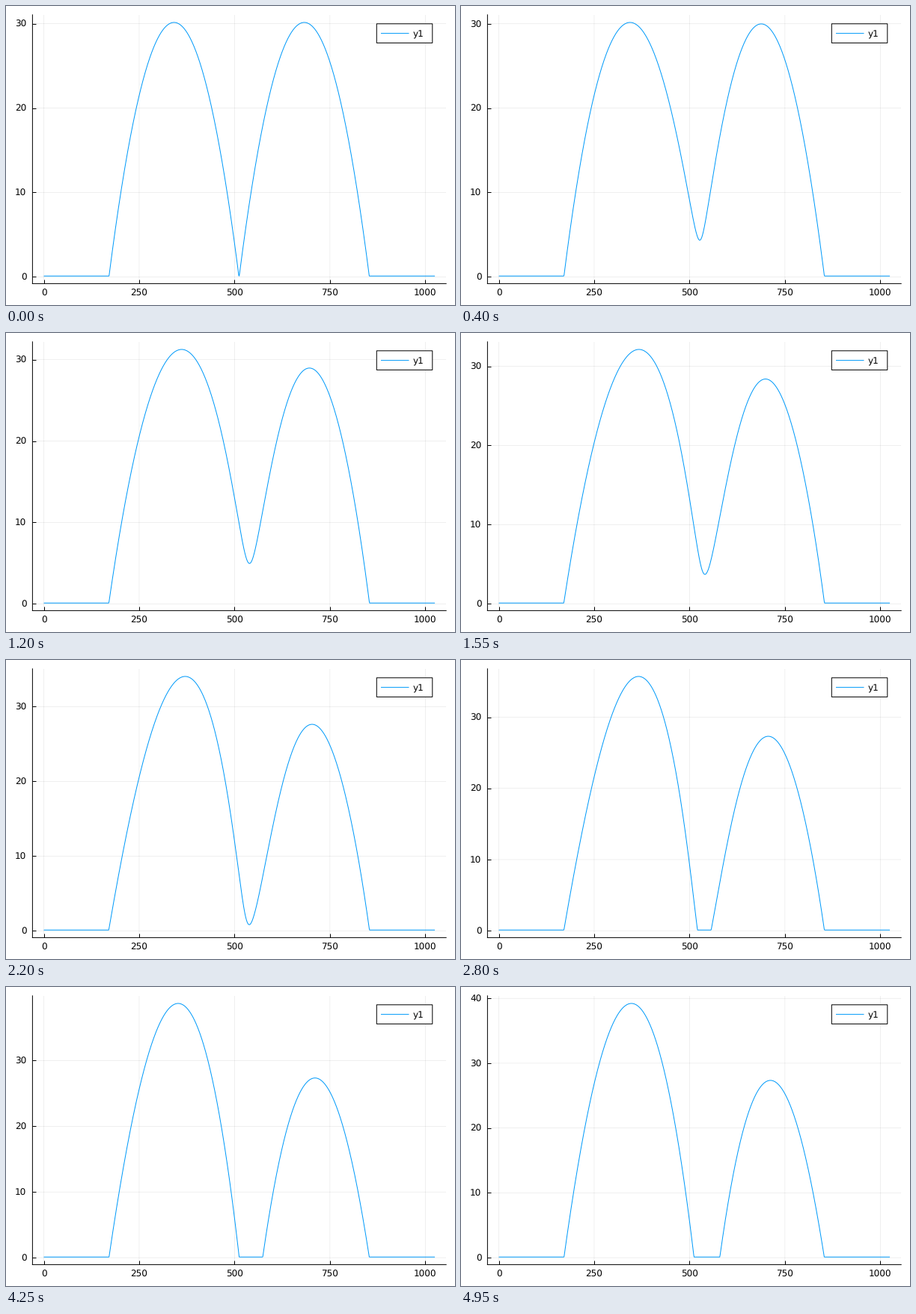
Animation of 600x400 px, one loop 5000 ms. Source, as a matplotlib script:

```python
import numpy as np
import matplotlib.pyplot as plt
from matplotlib.animation import FuncAnimation
from matplotlib.patches import Rectangle

W, H, DPI = 600, 400, 100
FRAMES, STEP = 100, 50
PX = 72 / DPI  # one pixel in points
BLUE = "#009AFA"

plt.rcParams.update({
    "font.family": "DejaVu Sans",
    "font.size": 12 * PX,
    "text.hinting": "none",
    "path.snap": False,
})

N = 1024
x = np.arange(1, N + 1)
OUTER_LEFT, MIDDLE, OUTER_RIGHT = N / 6, N / 2, N * 5 / 6
HEIGHT = 30.15  # both drops at the start
FILM = 0.1


def settle(t, tau, power):
    """Ease from 0 towards 1 around time tau."""
    return 1 - np.exp(-(t / tau) ** power)


def pulse(t, peak, power):
    """Rise from 0 to 1 at time peak, then fade."""
    s = t / peak
    return s**power * np.exp(power * (1 - s))


def cap(start, end, peak, height, bulge):
    """Skewed parabola over start..end; bulge fattens its flanks."""
    p = (peak - start) / (end - start)
    lean = p - 0.5
    skew = 2 * lean / (p * (1 - p) - 2 * lean * lean)
    u = (x - start) / (end - start)
    tilt = 1 + skew * (np.clip(u, 0, 1) - 0.5)
    f = u * (1 - u) * tilt / (p * (1 - p) * (1 + skew * lean))
    return height * f * (1 + bulge * (1 - np.clip(f, 0, 1)))


def profile(t):
    # the bridge grows, then breaks; the drops lend it some height
    bridge = 6.15 * np.cbrt(t) * (1 - settle(t, 3.1, 10))
    loan = 0.05 * bridge
    flow = pulse(t, 1.9, 8)

    # the left drop leans inwards while it fills
    left = cap(OUTER_LEFT, MIDDLE - 0.5 + 24 * pulse(t, 0.9, 1.6),
               N / 3 + 28 * pulse(t, 2.1, 3),
               HEIGHT + 9.35 * settle(t, 2.9, 2.35) - loan,
               0.1 * flow)

    # the right drop drains and its inner edge recedes
    edge = MIDDLE + 27.4 * t**0.56
    inward = np.clip((OUTER_RIGHT - x) / (OUTER_RIGHT - edge), 0, 1)
    right = cap(edge, OUTER_RIGHT,
                N * 2 / 3 + 32 * settle(t, 2, 1),
                HEIGHT - 2.8 * settle(t, 1.56, 2.2) - loan,
                -0.2 * flow * inward)

    joined = (left + right) / 2 + np.hypot((left - right) / 2, bridge)
    return np.maximum(joined, FILM)


fig = plt.figure(figsize=(W / DPI, H / DPI), dpi=DPI, facecolor="white")
left, right, top, bottom = 35.4, 588.2, 11.8, 371.4
ax = fig.add_axes([left / W, 1 - bottom / H,
                   (right - left) / W, (bottom - top) / H])
ax.spines[["top", "right"]].set_visible(False)
ax.spines[["left", "bottom"]].set_linewidth(PX)
ax.set_axisbelow(True)
ax.grid(color="black", alpha=0.1, linewidth=0.6 * PX)
ax.tick_params(direction="in", length=5 * PX, width=PX)
ax.tick_params(axis="x", pad=7 * PX)
ax.tick_params(axis="y", pad=8 * PX)
margin = 0.03 * (x[-1] - x[0])
ax.set_xlim(x[0] - margin, x[-1] + margin)
ax.set_xticks(range(0, 1001, 250))
curve, = ax.plot([], [], color=BLUE, linewidth=PX)

# legend, laid out in pixels
key = fig.add_axes([0, 0, 1, 1])
key.set_xlim(0, W)
key.set_ylim(H, 0)
key.axis("off")
key.add_patch(Rectangle((495.3, 23.8), 74.5, 25.6, facecolor="white",
                        edgecolor="black", linewidth=PX))
key.plot([501.5, 538], [36.6, 36.6], color=BLUE, linewidth=PX)
key.text(544, 41, "y1", va="baseline")


def draw(i):
    y = profile(i * STEP / 1000)
    curve.set_data(x, y)
    pad = 0.03 * (y.max() - y.min())
    ax.set_ylim(y.min() - pad, y.max() + pad)
    ax.set_yticks(np.arange(0, y.max() + pad, 10))
    return curve,


anim = FuncAnimation(fig, draw, frames=FRAMES, interval=STEP,
                     repeat=True, repeat_delay=0, blit=False)
plt.show()
```
